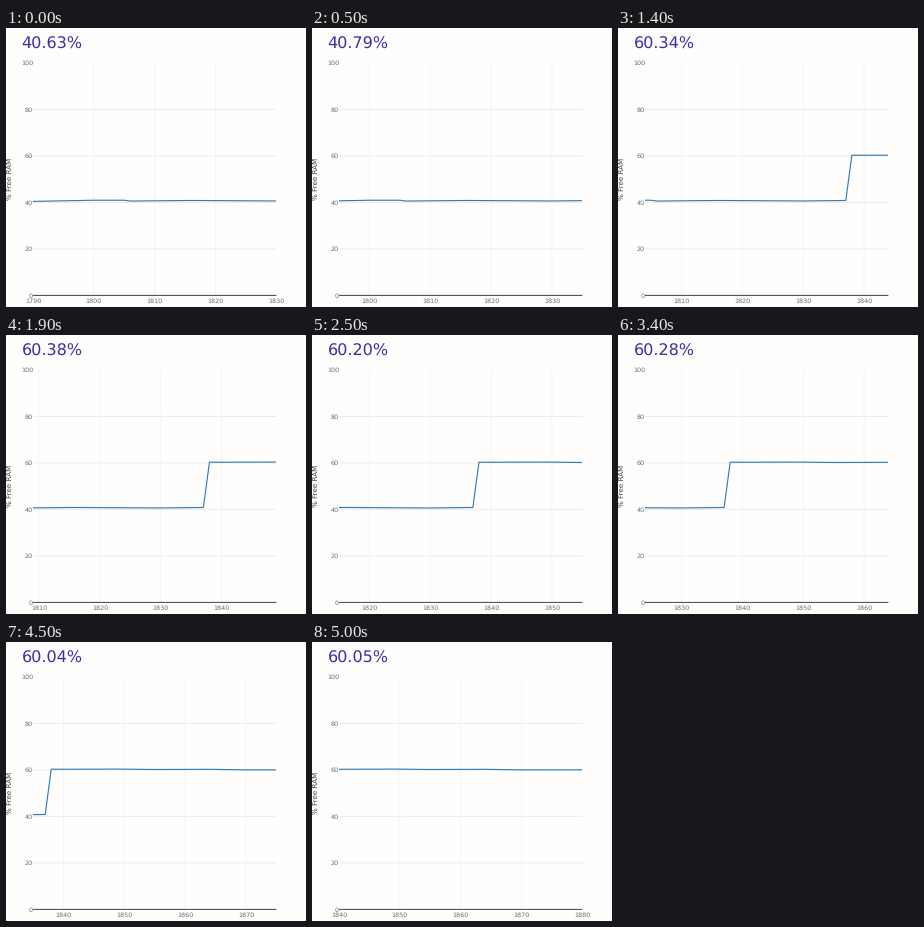
Write a matplotlib script that moves like this. It is 300 by 279 pixels and loops after 5.1 s.

```python
import numpy as np
import matplotlib.pyplot as plt
from matplotlib.animation import FuncAnimation
from matplotlib.patches import Rectangle

W, H, DPI = 300, 279, 100
LEFT, RIGHT, TOP, BOTTOM = 27, 270.4, 35, 267.4
START, SPAN, FRAMES = 1790, 40, 51
PT = 72 / DPI  # points per pixel

PAPER, ROW, COLUMN = "#fffefd", "#ececec", "#f4f4f4"
INK, TICK, BLUE, TITLE = "#444444", "#6e6e6e", "#327bb2", "#3a31a8"

plt.rcParams.update({"font.family": "DejaVu Sans", "text.hinting": "none"})

# Free memory idles near 40 %, then jumps to a second level near 60 %.
KEYS = [
    (1790, 40.45), (1800, 40.95), (1805, 40.95), (1806, 40.60),
    (1816, 40.85), (1830, 40.63), (1837, 40.85), (1838, 60.33),
    (1840, 60.30), (1849, 60.38), (1855, 60.20), (1864, 60.28),
    (1870, 60.03), (1880, 60.05),
]
times = np.arange(START, START + SPAN + FRAMES)
values = np.interp(times, *zip(*KEYS))


def to_x(t, first):
    return LEFT + (t - first) * (RIGHT - LEFT) / SPAN


def to_y(v):
    return BOTTOM - v * (BOTTOM - TOP) / 100


fig = plt.figure(figsize=(W / DPI, H / DPI), dpi=DPI, facecolor=PAPER)
ax = fig.add_axes([0, 0, 1, 1])
ax.set(xlim=(0, W), ylim=(H, 0))
ax.axis("off")


def rule(xs, ys, color, z=1):
    return ax.plot(xs, ys, color=color, lw=PT, zorder=z,
                   solid_capstyle="butt", snap=False)[0]


def label(x, y, text, size=6.4, color=TICK, **kw):
    return ax.text(x, y, text, fontsize=size * PT, color=color,
                   va="baseline", zorder=5, **kw)


for v in range(0, 101, 20):
    label(27, to_y(v) + 2.4, str(v), ha="right")
    if 0 < v < 100:
        rule([LEFT, RIGHT], [to_y(v)] * 2, ROW)
rule([LEFT, RIGHT], [BOTTOM] * 2, INK, 2)

label(6.4, 150.6, "% Free RAM", 7.1, INK, rotation=90,
      rotation_mode="anchor", ha="center")
title = label(15.5, 21, "", 16, TITLE)

curve = ax.plot([], [], color=BLUE, lw=1.15 * PT, zorder=3,
                solid_joinstyle="round")[0]
curve.set_clip_path(Rectangle((LEFT, TOP), RIGHT - LEFT, BOTTOM - TOP,
                              transform=ax.transData))

ticks = range(START, START + SPAN + FRAMES, 10)
columns = [rule([0, 0], [TOP, BOTTOM], COLUMN) for _ in ticks]
years = [label(0, 274.7, str(t), ha="center") for t in ticks]


def draw(i):
    first, last = START + i, START + i + SPAN
    window = slice(i, i + SPAN + 1)
    curve.set_data(to_x(times[window], first), to_y(values[window]))
    title.set_text(f"{values[i + SPAN]:.2f}%")
    for t, column, year in zip(ticks, columns, years):
        x = to_x(t, first)
        column.set_xdata([x, x])
        column.set_visible(first < t < last)
        year.set_x(x)
        year.set_visible(first <= t <= last)
    return [curve, title, *columns, *years]


anim = FuncAnimation(fig, draw, frames=FRAMES, interval=100,
                     repeat=True, repeat_delay=0)
plt.show()
```
